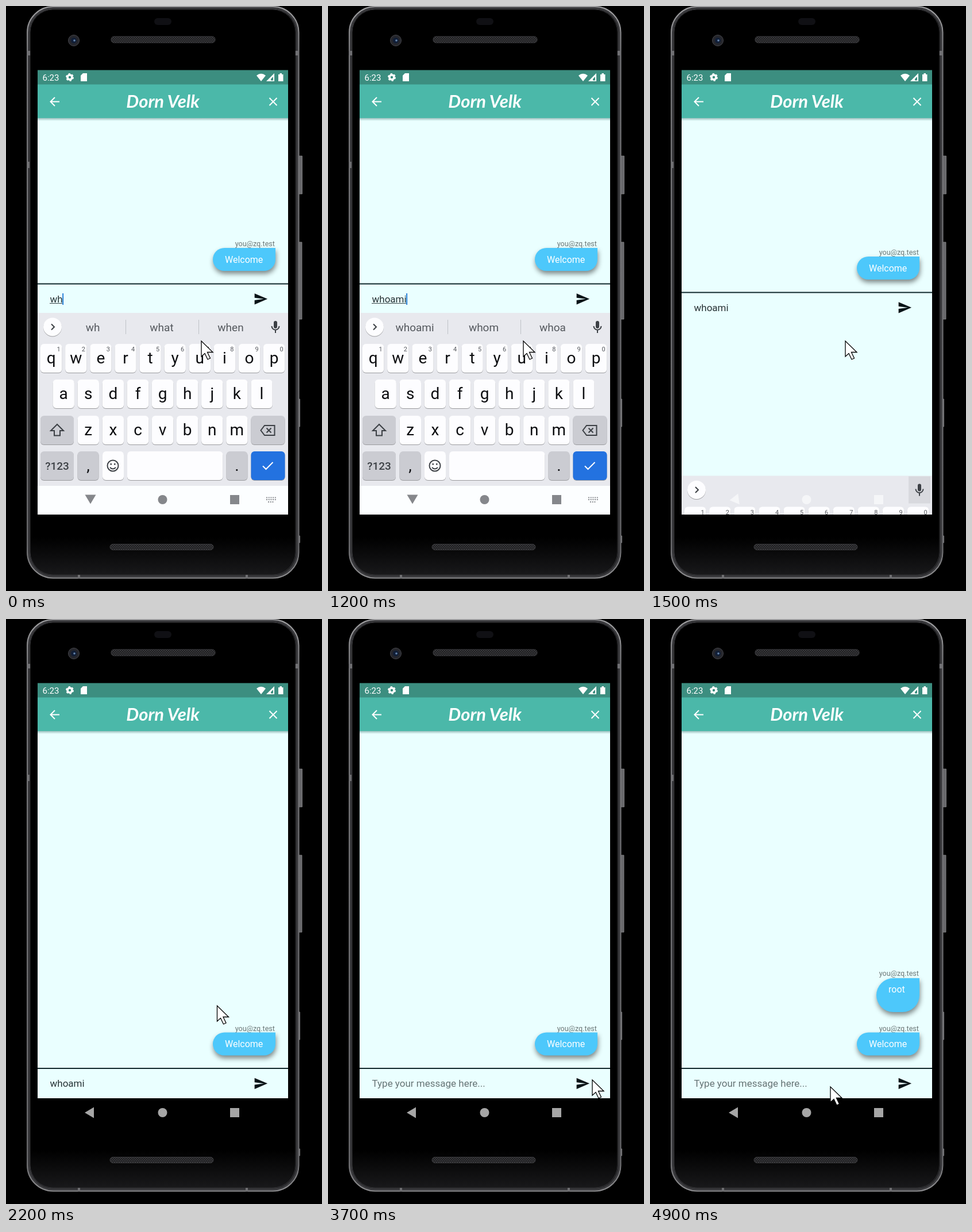
These frames come from a looping animation (550x1018 px, 5 s). An HTML page:

```html
<!DOCTYPE html>
<html lang="en">
<head>
<meta charset="utf-8">
<title>Chat on a phone</title>
<style>
html, body { margin: 0; width: 100%; height: 100%; overflow: hidden; background: #000; }
svg { display: block; width: 550px; height: 1018px; font-family: Roboto, sans-serif; }
.key { fill: #fdfdff; filter: drop-shadow(0 1px .6px #0005); }
.dark { fill: #cbccd2; }
.go { fill: #2372e0; }
.mid { text-anchor: middle; }
.letter { font-size: 28px; fill: #0c0d10; }
.digit { font-size: 11px; fill: #55585d; }
.hint { font-size: 19px; fill: #54585d; }
.mail { font-size: 12.6px; fill: #6c7878; text-anchor: end; }
.bubble { fill: #4dc8fb; filter: drop-shadow(1px 5px 4px #0007); }
.said { font-size: 16px; fill: #fff; }
.line { fill: none; stroke: #3c4045; stroke-width: 2; }
</style>
</head>
<body>
<svg viewBox="0 0 550 1018">
  <defs>
    <linearGradient id="face" x2="0" y2="1">
      <stop offset=".93" stop-color="#000"/><stop offset="1" stop-color="#1a1a1c"/>
    </linearGradient>
    <linearGradient id="rim" x2="0" y2="1">
      <stop stop-color="#a0a0a2"/><stop offset=".08" stop-color="#7c7c7f"/>
      <stop offset=".94" stop-color="#6c6c6f"/><stop offset="1" stop-color="#8c8c8e"/>
    </linearGradient>
    <pattern id="mesh" width="4" height="4" patternUnits="userSpaceOnUse">
      <path fill="#1c1c1e" d="M0 0h4v4H0z"/><path fill="#39393c" d="M0 0h2v2H0zM2 2h2v2H2z"/>
    </pattern>
    <linearGradient id="shade" x2="0" y2="1">
      <stop stop-color="#0a4a45" stop-opacity=".35"/><stop offset="1" stop-color="#0a4a45" stop-opacity="0"/>
    </linearGradient>
    <clipPath id="screen"><path d="M55 111.5H491V885H55z"/></clipPath>
  </defs>

  <!-- phone body -->
  <g fill="#68686b" stroke="#8c8c8f" stroke-width=".8">
    <path d="M509 261h6.500v66H509zM509 411h6v134h-6zM509 684h2.500v48H509zM509 922h2.500v12H509z"/>
  </g>
  <rect x="39" y="3" width="468.500" height="990.500" rx="43" fill="url(#face)" stroke="#3a3a3d" stroke-width="5"/>
  <rect x="37" y="1" width="472.500" height="994.500" rx="45" fill="none" stroke="url(#rim)" stroke-width="2"/>
  <rect x="42" y="6" width="462" height="984" rx="40" fill="none" stroke="#38383b"/>
  <path d="M36 78h6v8h-6zM504 78h6v8h-6zM36 271h5v11h-5zM125 990h4v6h-4zM417 990h4v6h-4z" fill="#707073"/>
  <rect x="258" y="21" width="30" height="12" rx="6" fill="#101014"/>
  <g fill="url(#mesh)" stroke="#3b3b3e">
    <rect x="183" y="53" width="181" height="11" rx="5"/>
    <rect x="181" y="936.500" width="180" height="10" rx="5"/>
  </g>
  <circle cx="118" cy="60" r="9.500" fill="#25262c" stroke="#46464b"/>
  <circle cx="118" cy="60" r="5" fill="#111e36"/>
  <circle cx="119" cy="60" r="1.800" fill="#6686ad"/>

  <g clip-path="url(#screen)">
    <path id="page" fill="#eaffff"/>
    <path d="M55 195h437v5H55z" fill="url(#shade)"/>
    <path d="M55 111h437v26H55z" fill="#3c8e80"/>
    <path d="M55 136.500h437V195H55z" fill="#4bb8a9"/>
    <g fill="#fff">
      <text x="63.500" y="130" font-size="15">6:23</text>
      <circle cx="111" cy="124" r="4" fill="none" stroke="#fff" stroke-width="3.600"/>
      <circle cx="111" cy="124" r="6" fill="none" stroke="#fff" stroke-width="2" stroke-dasharray="3.140"/>
      <path d="M134 117h7v14h-11v-10z"/>
      <path d="M436 121q8-6.500 16 0l-8 10z"/>
      <path d="M467 117v14h-14z"/><path d="M465 123v6.500h-4v-2.500z" fill="#3c8e80"/>
      <path d="M474 119h2.500v-2h3.500v2h2.500v12H474z"/>
      <text class="mid" x="273" y="177" font-size="31" font-weight="700" font-style="italic" style="font-family:Lato,cursive">Dorn Velk</text>
      <path d="M93 166.500H78M85 159l-7.500 7.500L85 174M458.500 160l13 13M471.500 160l-13 13" fill="none" stroke="#fff" stroke-width="2"/>
    </g>

    <g id="chat">
      <text class="mail" x="468" y="418">you@zq.test</text>
      <path class="bubble" d="M380 421h89v20a20 20 0 0 1-20 20h-69a20 20 0 0 1 0-40z"/>
      <text class="said" x="381" y="446.500">Welcome</text>
      <path d="M55 482.500h437v2H55z" fill="#12282c"/>
      <text id="entry" x="76.500" y="515.500" font-size="17"></text>
      <path id="under" fill="#394548"/>
      <path id="caret" fill="#2a83d8"/>
      <path transform="translate(430.500 497) scale(1.070)" d="M2 21L23 12 2 3v7l15 2-15 2z" fill="#0a1418"/>
    </g>
    <g id="reply">
      <text class="mail" x="468" y="621">you@zq.test</text>
      <path class="bubble" d="M423.500 625H469v29.500a29.500 29.500 0 0 1-29.500 29.500h-16a29.500 29.500 0 0 1 0-59z"/>
      <text class="said" x="415" y="650">root</text>
    </g>

    <g id="board">
      <path d="M55 534h437v301H55z" fill="#e8e9ee"/>
      <path d="M55 835h437v301H55z" fill="#fcfeff"/>
      <path id="press" d="M450 535h38v47h-38z" fill="#d8d9de"/>
      <circle cx="81" cy="558.500" r="16" class="key"/>
      <path class="line" d="M79 553.500l5 5-5 5"/>
      <rect x="466" y="548" width="6" height="13" rx="3" fill="#3c4045"/>
      <path class="line" d="M462.500 557a6.500 6.500 0 0 0 13 0M469 564v5"/>
      <g id="hints">
        <path d="M208.500 546v25M335.500 546v25" stroke="#bfc2c7"/>
        <text class="hint mid" x="151" y="566"></text>
        <text class="hint mid" x="271" y="566"></text>
        <text class="hint mid" x="391" y="566"></text>
      </g>
      <g id="keys"></g>
      <path class="line" d="M89 728l-11 11h6v8.500h10V739h6z"/>
      <path class="line" d="M450 730h17.500v17H450l-6.500-8.500zM453.500 734.500l8 8M461.500 734.500l-8 8"/>
      <circle class="line" cx="186" cy="800" r="9.500"/>
      <path class="line" d="M181 803q5 5 10 0"/>
      <path d="M181.500 796h2.500v2.500h-2.500zM188 796h2.500v2.500H188z" fill="#3c4045"/>
      <text class="mid" x="89" y="807" font-size="19" fill="#3c4045" font-weight="500">?123</text>
      <path d="M447 800.500l5.500 5.500 12-12" fill="none" stroke="#fff" stroke-width="2"/>
    </g>

    <g id="nav">
      <path id="back" d="M-9-8H10L.5 8z"/>
      <circle cx="272.500" cy="859" r="8"/>
      <path d="M390 851h16v16h-16z"/>
    </g>
    <path id="dots" d="M453 855.500h17M453 859h17M456 863h11" stroke="#8a8d91" stroke-width="2" stroke-dasharray="2 1.700"/>
  </g>
  <path id="mouse" d="M0 0V27l6-5.500 5 10.500 4.500-2-5-10.500H20z" fill="#fff" stroke="#000" stroke-width="1.300"/>
</svg>
<script>
const $ = id => document.getElementById(id);

// Keyboard
let keys = '';
const key = (x, y, w, kind = '') => keys += `<rect class="key ${kind}" x="${x}" y="${y}" width="${w}" height="50" rx="6"/>`;
const label = (kind, x, y, s) => keys += `<text class="mid ${kind}" x="${x}" y="${y}">${s}</text>`;
[['qwertyuiop', 78.7, 588], ['asdfghjkl', 100.2, 650], ['zxcvbnm', 143.3, 713]].forEach(([row, x0, y], r) =>
  [...row].forEach((c, i) => {
    const x = x0 + 43.1 * i;
    key(x - 18.7, y, 37.4);
    label('letter', x, y + 34, c);
    if (!r) label('digit', x + 13, y + 13, (i + 1) % 10);
  }));
[[60, 713, 58, 'dark'], [426.5, 713, 59, 'dark'], [60, 775, 58, 'dark'], [124.5, 775, 37, 'dark'],
 [168, 775, 37], [211, 775, 166.5], [383.5, 775, 37, 'dark'], [426.5, 775, 59, 'go']].forEach(k => key(...k));
label('letter', 143, 809, ',');
label('letter', 402, 809, '.');
$('keys').innerHTML = keys;

// start time, text, underlined letters, suggestions
const typing = [
  [0, 'wh', 2, 'wh what when'],
  [200, 'who', 3, "who who's whole"],
  [400, 'whoa', 4, "whoa whoami who's"],
  [600, 'whoam', 4, "whoa whoami who's"],
  [700, 'whoam', 5, 'whoam whoami whom'],
  [800, 'whoami', 6, 'whoami whom whoa'],
  [1400, 'whoami', 0, ''],
  [3300, 'Type your message here...', 0, '']
];
const path = [
  [0, 340, 583], [1900, 340, 583], [2200, 367.5, 673], [2400, 475, 811], [2900, 470, 809], [3100, 460, 802],
  [4000, 460, 802], [4200, 395, 770], [4500, 340, 775], [4800, 322, 790], [4900, 314, 814]
];
const entry = $('entry'), hints = $('hints').querySelectorAll('text');
const show = (id, on) => $(id).style.display = on ? '' : 'none';
const move = (id, x, y, turn = 0) => $(id).setAttribute('transform', `translate(${x} ${y}) rotate(${turn})`);
const fill = (id, color) => $(id).setAttribute('fill', color);

function draw(t) {
  const [, text, lined, words] = typing.findLast(s => t >= s[0]);
  entry.textContent = text;
  fill('entry', t < 3300 ? '#273235' : '#667374');
  $('under').setAttribute('d', lined ? `M76 517h${entry.getSubStringLength(0, lined)}v1H76z` : '');
  $('caret').setAttribute('d', `M${76 + entry.getComputedTextLength()} 500h2v20h-2z`);
  show('caret', t < 1400);
  show('hints', words);
  hints.forEach((h, i) => h.textContent = words.split(' ')[i] || '');

  const closing = t >= 1400 && t < 1600, closed = t >= 1600;
  move('board', 0, t < 1400 ? 0 : t < 1500 ? 15.3 : 283.5);
  move('chat', 0, t < 1500 ? 0 : closed ? 298.5 : 15);
  show('board', !closed);
  show('press', t >= 1500);
  show('dots', t < 1400);
  $('page').setAttribute('d', `M55 195h437V${closed ? 834 : 885}H55z`);
  move('back', closed ? 145 : 146.5, 858.5, t < 1400 ? 0 : closed ? 90 : t < 1500 ? 15 : 82);
  fill('nav', closed ? '#a6a6a6' : !closing ? '#85878b' : t < 1500 ? '#d2d4d6' : '#f5f6f8');
  show('reply', t >= 4500);

  const n = path.findLastIndex(p => t >= p[0]), a = path[n], b = path[n + 1] || a;
  const f = (t - a[0]) / (b[0] - a[0] || 1);
  move('mouse', a[1] + (b[1] - a[1]) * f, a[2] + (b[2] - a[2]) * f);
}

const start = performance.now();
(function tick() {
  draw(Math.floor((performance.now() - start) % 5000 / 100) * 100);
  requestAnimationFrame(tick);
})();
</script>
</body>
</html>
```
